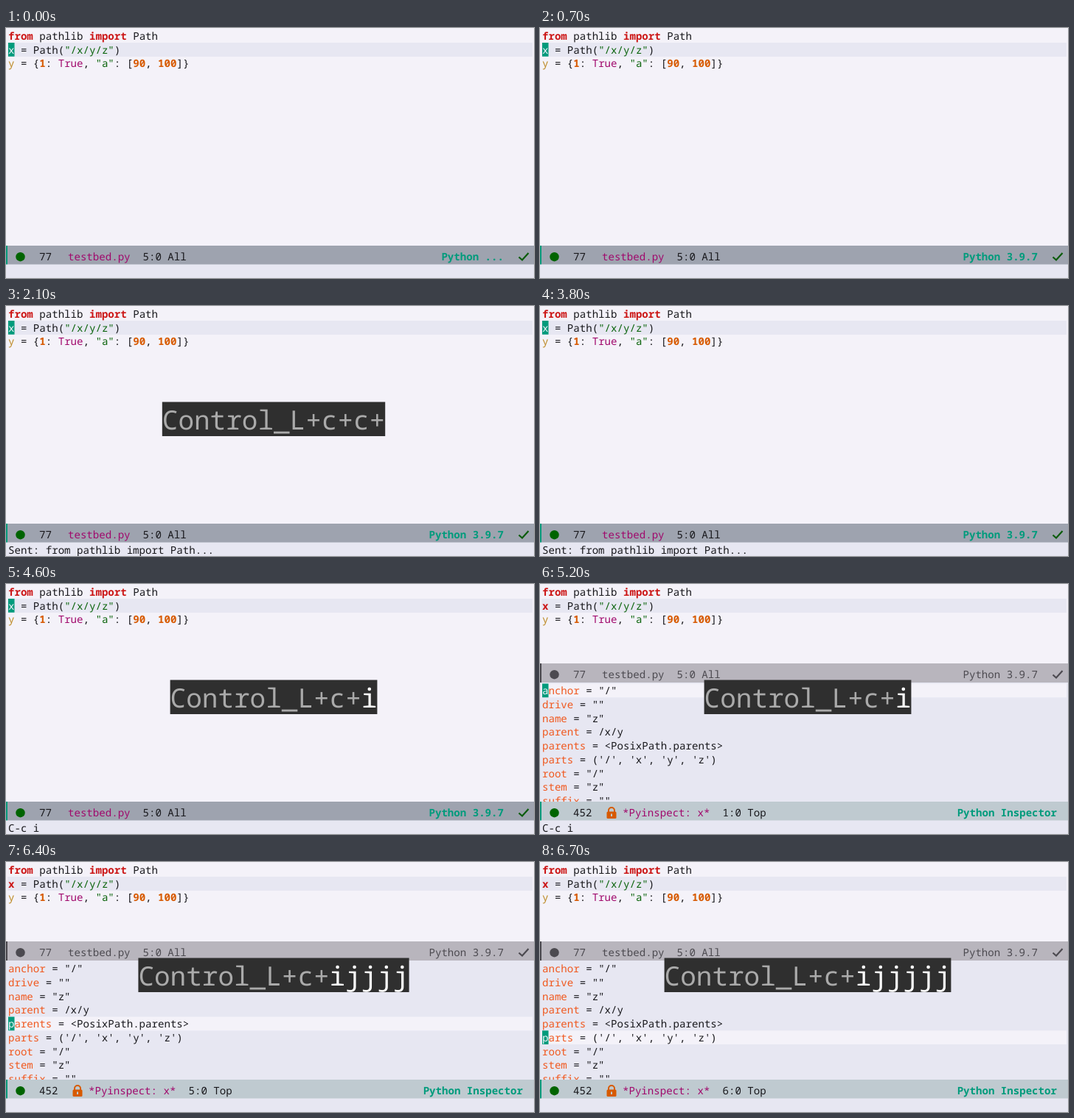
Recreate the animation shown at these times as an HTML page with a canvas. Size 716x340 px, loop 8 s.

```html
<!DOCTYPE html>
<html lang="en">
<head>
<meta charset="utf-8">
<title>Python inspector</title>
<style>
html, body { margin: 0; width: 100%; height: 100%; overflow: hidden; background: #f4f2f9; }
canvas { display: block; }
</style>
</head>
<body>
<canvas id="stage" width="716" height="340"></canvas>
<script>
const g = document.getElementById('stage').getContext('2d');
const LOOP = 8000, COL = 8.46, ROW = 18.75;
const MONO = '"Noto Sans Mono", "DejaVu Sans Mono", monospace';
const C = {
  paper: '#f4f2f9', shade: '#e7e7f2', ink: '#18181c', teal: '#009b7c',
  red: '#cc1717', green: '#0b640c', plum: '#a0086c', orange: '#d75a00',
  field: '#f0581e', gold: '#bd8a25', dim: '#4c4a50',
  bar: '#9ea3af', barIdle: '#b8b5bd', barInspect: '#bfcad0'
};

// Each list holds [start time, value]; the latest started value applies.
const KEYS = [
  [0, ''], [1400, 'Control_L+'], [1700, 'Control_L+c+'], [1900, 'Control_L+c+c+'],
  [3800, ''], [3900, 'Control_L+'], [4100, 'Control_L+c+'], [4500, 'Control_L+c+i'],
  [5500, 'Control_L+c+ij'], [5800, 'Control_L+c+ijj'], [6100, 'Control_L+c+ijjj'],
  [6400, 'Control_L+c+ijjjj'], [6600, 'Control_L+c+ijjjjj']
];
const ECHO = [[0, ''], [2000, 'Sent: from pathlib import Path...'], [4100, ''], [4500, 'C-c i'], [5500, '']];
const LINE = [[0, 1], [5500, 2], [5800, 3], [6100, 4], [6400, 5], [6600, 6]];
const VERSION = [[0, 'Python ...'], [500, 'Python 3.9.7']];
const SPLIT = 4700;

const FIELDS = [
  ['anchor', '"/"'], ['drive', '""'], ['name', '"z"'], ['parent', '/x/y'],
  ['parents', '<PosixPath.parents>'], ['parts', "('/', 'x', 'y', 'z')"],
  ['root', '"/"'], ['stem', '"z"'], ['suffix', '""']
];

const at = (list, t) => list.filter(e => e[0] <= t).pop()[1];

function rect(x, y, w, h, color) {
  g.fillStyle = color;
  g.fillRect(x, y, w, h);
}

function text(str, x, y, color, weight = 500, size = 14.1) {
  g.font = `${weight} ${size}px ${MONO}`;
  g.fillStyle = color;
  g.fillText(str, x, y);
}

// Draws [string, color, weight] runs side by side.
function runs(parts, x, y) {
  for (const [str, color = C.ink, weight] of parts) {
    text(str, x, y, color, weight);
    x += str.length * COL;
  }
}

function cursor(ch, top) {
  rect(3, top, 8.5, ROW, C.teal);
  text(ch, 3, top + 14.5, C.paper);
}

function code(focused) {
  rect(2, 20, 712, 19, C.shade);
  runs([['from', C.red, 600], [' pathlib '], ['import', C.red, 600], [' Path']], 3, 16);
  runs([['x', C.red, 600], [' = Path('], ['"/x/y/z"', C.green], [')']], 3, 34.7);
  runs([['y', C.gold], [' = {'], ['1', C.orange, 700], [': '], ['True', C.plum], [', '],
    ['"a"', C.green], [': ['], ['90', C.orange, 700], [', '], ['100', C.orange, 700], [']}']], 3, 53.4);
  if (focused) cursor('x', 20);
}

function check(y, color) {
  g.strokeStyle = color;
  g.lineWidth = 2.2;
  g.beginPath();
  g.moveTo(695.5, y + 0.5);
  g.lineTo(700, y + 4.5);
  g.lineTo(708.5, y - 5);
  g.stroke();
}

function bar(top, bg, dot, edge) {
  rect(0, top, 716, 26, bg);
  rect(0, top, 2, 26, edge);
  g.fillStyle = dot;
  g.beginPath();
  g.arc(19.5, top + 15.2, 6.2, 0, 2 * Math.PI);
  g.fill();
}

function right(str, edge, y, color, weight) {
  text(str, edge - str.length * COL, y, color, weight);
}

function fileBar(top, active, version) {
  const pick = color => active ? color : C.dim;
  bar(top, active ? C.bar : C.barIdle, pick('#006400'), pick(C.teal));
  const y = top + 19.8;
  text('77', 45, y, pick(C.ink));
  text('testbed.py', 84, y, pick(C.plum));
  text('5:0 All', 185.5, y, pick(C.ink));
  right(version, 675, y, pick(C.teal), active ? 700 : 500);
  check(top + 15, pick('#0a5c0a'));
}

function lock(x, y) {
  g.strokeStyle = C.orange;
  g.lineWidth = 2;
  g.beginPath();
  g.moveTo(x - 4, y);
  g.lineTo(x - 4, y - 3);
  g.arc(x, y - 3, 4, Math.PI, 0);
  g.lineTo(x + 4, y);
  g.stroke();
  g.fillStyle = C.orange;
  g.beginPath();
  g.roundRect(x - 6.5, y - 1.5, 13, 9.5, 1.5);
  g.fill();
  rect(x - 1, y + 1.5, 2, 3.5, C.barInspect);
}

function inspector(line) {
  rect(0, 134, 716, 162, C.shade);
  const top = 135.5 + (line - 1) * ROW;
  rect(2, top, 712, ROW, C.paper);
  FIELDS.forEach(([name, value], i) =>
    runs([[name, C.field], [' = ' + value]], 3, 150 + i * ROW));
  cursor(FIELDS[line - 1][0][0], top);

  bar(296, C.barInspect, '#006400', C.teal);
  text('452', 45, 315.8, C.ink);
  lock(97, 311);
  text('*Pyinspect: x*', 112, 315.8, C.plum);
  text(line + ':0 Top', 247.5, 315.8, C.ink);
  right('Python Inspector', 701, 315.8, C.teal, 700);
}

function overlay(keys) {
  if (!keys) return;
  const step = 21.6, w = keys.length * step, x = 363 - w / 2;
  rect(x, 130.5, w, 46.5, '#2f2f2f');
  const held = keys.slice(0, keys.lastIndexOf('+') + 1);
  text(held, x, 167.5, '#aaaaaa', 400, 36);
  text(keys.slice(held.length), x + held.length * step, 167.5, '#ffffff', 500, 36);
}

function draw(t) {
  const split = t >= SPLIT, version = at(VERSION, t);
  g.textRendering = 'geometricPrecision';
  rect(0, 0, 716, 340, C.paper);
  code(!split);
  if (split) {
    fileBar(108, false, version);
    inspector(at(LINE, t));
  } else {
    fileBar(296, true, version);
  }
  rect(0, 321.5, 716, 18.5, C.shade);
  text(at(ECHO, t), 3, 337, C.ink);
  overlay(at(KEYS, t));
}

const start = performance.now();
function tick() {
  draw((performance.now() - start) % LOOP);
  requestAnimationFrame(tick);
}
tick();
</script>
</body>
</html>
```
